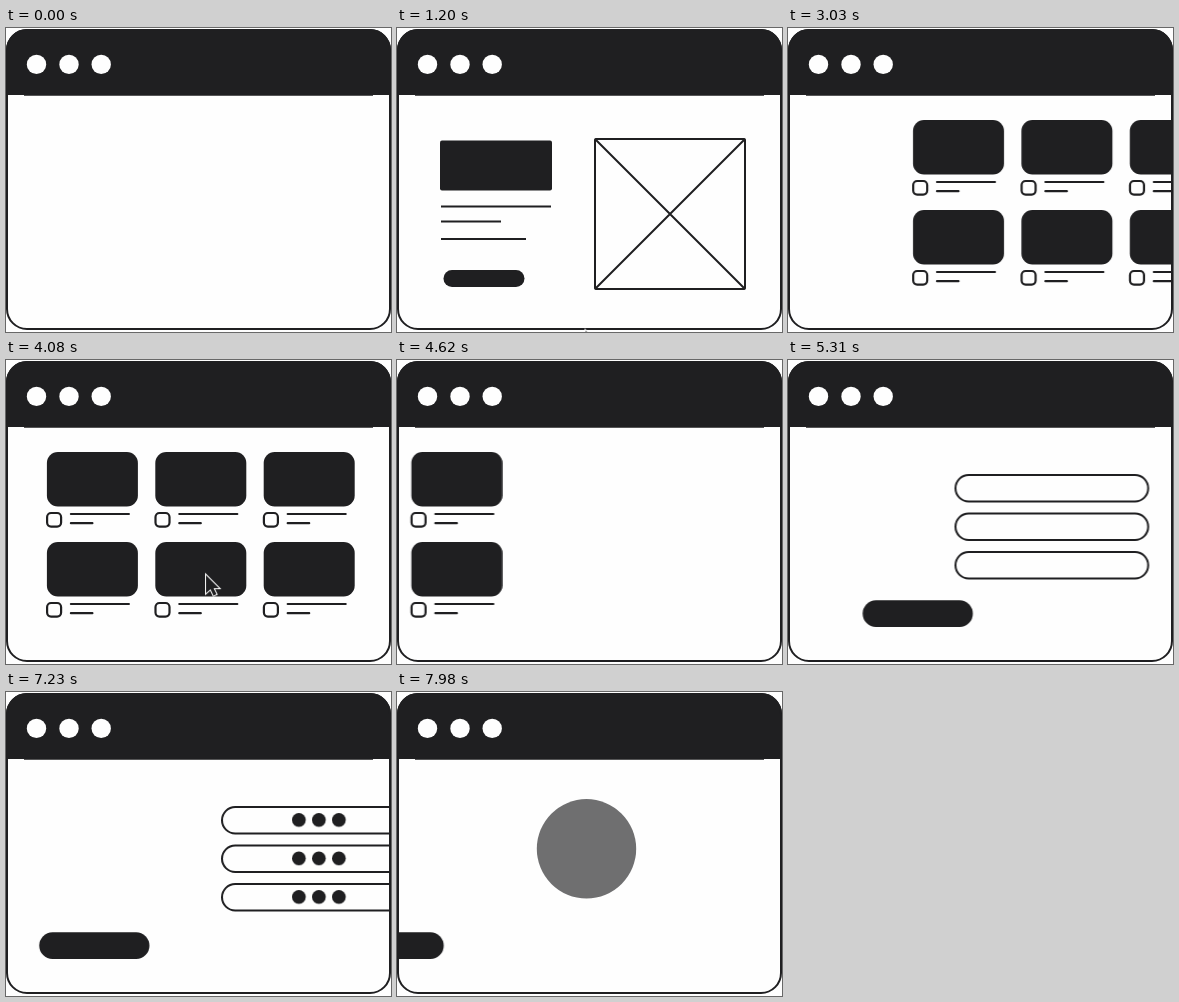
Write an HTML page that moves like this. It is 385 px wide and 304 px high and loops after 8000 ms.

```html
<!DOCTYPE html>
<html lang="en">
<head>
<meta charset="utf-8">
<title>Browser wireframes</title>
<style>
  :root {
    --ink: #1f1f21;
    --paper: #fefefe;
  }
  html, body { margin: 0; width: 100%; height: 100%; overflow: hidden; background: var(--paper); }
  svg { display: block; width: 385px; height: 304px; fill: var(--ink); }
  .line { fill: none; stroke: var(--ink); stroke-width: 2; stroke-linejoin: round; }
  .round { stroke-linecap: round; stroke-width: 2.2; }
  .paper { fill: var(--paper); }

  .hero, .cards, .fields, .submit, .disc, .cursor { animation: 8s linear infinite; }
  .hero { animation-name: hero; }
  .cards { animation-name: cards; }
  .fields { --off: 292px; animation-name: form; }
  .submit { --off: -249px; animation-name: submit; }
  .disc { animation-name: disc; }
  .cursor { animation-name: cursor; stroke: var(--paper); stroke-width: 2; paint-order: stroke; }

  .pulse, .dot {
    transform-box: fill-box;
    transform-origin: center;
    animation: pulse 8s linear var(--at) infinite backwards;
  }
  .dot { animation-name: pop; }

  /* (.333, .533, .667, .92) slows down, (.333, .08, .667, .467) speeds up */
  @keyframes hero {
    0%, 1.55% { transform: translateX(var(--off)); animation-timing-function: cubic-bezier(.333, .533, .667, .92); }
    4.6%, 22.2% { transform: none; animation-timing-function: cubic-bezier(.333, .08, .667, .467); }
    28.5%, 100% { transform: translateX(var(--off)); }
  }
  @keyframes cards {
    0%, 33.19% { transform: translateX(345px); animation-timing-function: cubic-bezier(.333, .533, .667, .92); }
    41.175%, 51.66% { transform: none; animation-timing-function: cubic-bezier(.333, .08, .667, .467); }
    59.34%, 100% { transform: translateX(-352px); }
  }
  @keyframes form {
    0%, 62.44% { transform: translateX(var(--off)); animation-timing-function: cubic-bezier(.333, .533, .667, .92); }
    69.25%, 84.7% { transform: none; animation-timing-function: cubic-bezier(.333, .08, .667, .467); }
    94.5%, 100% { transform: translateX(var(--off)); }
  }
  /* the button comes back for the next screen */
  @keyframes submit {
    0%, 62.44% { transform: translateX(var(--off)); animation-timing-function: cubic-bezier(.333, .533, .667, .92); }
    69.25%, 84.7% { transform: none; animation-timing-function: cubic-bezier(.333, .08, .667, .467); }
    94.5%, 98.93% { transform: translateX(var(--off)); animation-timing-function: linear; }
    100% { transform: translateX(-187px); }
  }
  @keyframes disc {
    0%, 97.3% { opacity: 0; }
    100% { opacity: .705; }
  }
  @keyframes pulse {
    0%, 2.4%, 100% { transform: none; }
    1.2% { transform: scale(var(--grow)); }
  }
  @keyframes pop {
    0% { transform: scale(0); }
    1.2% { transform: scale(1.12); }
    1.9%, 24% { transform: none; }
    24.1%, 100% { transform: scale(0); }
  }
  @keyframes cursor {
    0%, 14.94% { transform: translate(194px, 306px); animation-timing-function: cubic-bezier(.333, .533, .667, .92); }
    16.9%, 17.9% { transform: translate(100px, 249px); animation-timing-function: cubic-bezier(.333, .08, .667, .467); }
    19.6% { transform: translate(188px, 306px); }
    48.3% { transform: translate(230px, 306px); animation-timing-function: cubic-bezier(.333, .533, .667, .92); }
    50.25%, 51% { transform: translate(200px, 215px); animation-timing-function: cubic-bezier(.333, .08, .667, .467); }
    52.9% { transform: translate(230px, 306px); }
    81.1% { transform: translate(240px, 306px); animation-timing-function: cubic-bezier(.333, .533, .667, .92); }
    83%, 84% { transform: translate(200px, 252px); animation-timing-function: cubic-bezier(.333, .08, .667, .467); }
    85.6%, 100% { transform: translate(240px, 306px); }
  }
</style>
</head>
<body>
<svg viewBox="0 0 385 304">
  <defs>
    <clipPath id="page"><rect x="1" y="68" width="382.5" height="233"/></clipPath>
  </defs>

  <g clip-path="url(#page)">
    <g class="hero" style="--off:-160px">
      <rect x="43" y="112.5" width="112" height="50" rx="2"/>
      <path class="line" d="M44 178.5H154M44 193.5H104M44 211H129"/>
      <rect class="pulse" style="--at:1.33s;--grow:1.05" x="46.5" y="242" width="81" height="17" rx="8.5"/>
    </g>
    <g class="hero" style="--off:190px">
      <rect class="line" x="198" y="111" width="150" height="150" rx="1"/>
      <path class="line" d="M198 111L348 261M348 111L198 261"/>
    </g>

    <g class="cards" id="cards"></g>
    <g class="fields" id="fields"></g>
    <circle class="disc" cx="189.5" cy="156.8" r="49.7"/>
    <g class="submit">
      <rect class="pulse" style="--at:6.62s;--grow:1.04" x="137.3" y="240.3" width="110.2" height="26.7" rx="13.3"/>
    </g>
  </g>

  <path d="M0 67V22A21 21 0 0 1 21 1H364A21 21 0 0 1 385 22V67H367V67.8H18V67Z"/>
  <rect class="line" x="1" y="2" width="383" height="299" rx="20"/>
  <g class="paper">
    <circle cx="30.5" cy="36.4" r="9.7"/>
    <circle cx="63" cy="36.4" r="9.7"/>
    <circle cx="95.2" cy="36.4" r="9.7"/>
  </g>

  <path class="cursor" d="M0 0V18L4.5 14L7.5 20.5L10.5 19L7.5 13H13Z"/>
</svg>

<script>
  const range = n => [...Array(n).keys()];

  const card = (x, y) => `<g transform="translate(${x} ${y})">
    <rect width="91" height="54.5" rx="11"/>
    <rect class="line round" x="0.2" y="61" width="14" height="13.6" rx="4"/>
    <path class="line round" d="M24 62H82M24 71.2H45.5"/></g>`;

  document.getElementById('cards').innerHTML =
    range(6).map(i => card(40.9 + i % 3 * 108.4, 92 + (i / 3 | 0) * 90)).join('');

  // typing start and gap between dots, in ms, per field
  const typing = [[5670, 160], [6200, 40], [6320, 40]];

  const field = ([start, gap], row) => {
    const y = 115 + row * 38.5;
    const dots = range(3).map(i =>
      `<circle class="dot" style="--at:${start + i * gap}ms" cx="${170.8 + i * 20}" cy="${y + 12.9}" r="6.9"/>`);
    return `<rect class="line pulse" style="--at:${start}ms;--grow:1.018"
      x="94" y="${y}" width="192.7" height="26.5" rx="13.2"/>` + dots.join('');
  };

  document.getElementById('fields').innerHTML = typing.map(field).join('');
</script>
</body>
</html>
```
